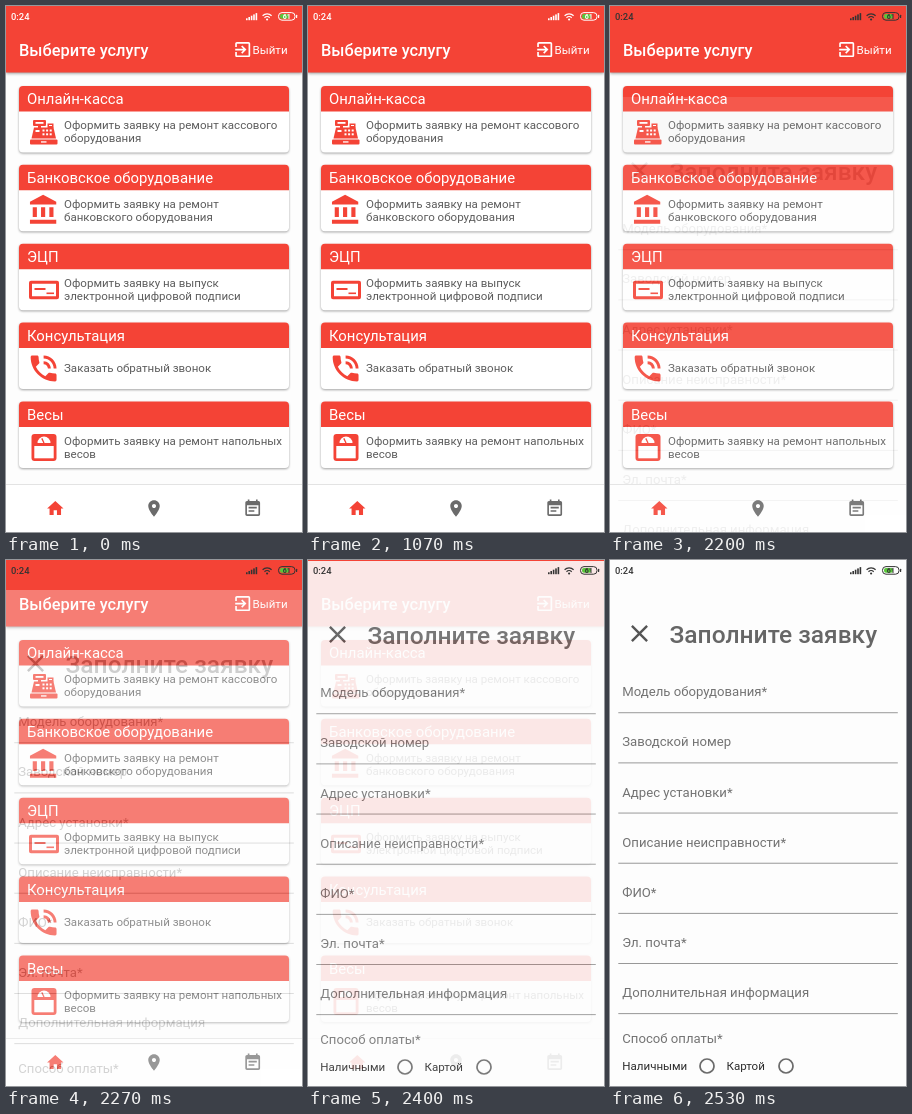
Write an HTML page that moves like this. It is 296x526 px and loops after 3390 ms.

```html
<!DOCTYPE html>
<html lang="ru">
<head>
<meta charset="utf-8">
<title>Выберите услугу</title>
<style>
  html, body { margin: 0; width: 100%; height: 100%; overflow: hidden; background: #fdfdfd; }
  svg { display: block; width: 296px; height: 526px; font-family: Roboto, "Noto Sans", sans-serif; }
  .bar { filter: drop-shadow(0 1px 1.5px rgba(0, 0, 0, .4)); }
  .card { filter: drop-shadow(0 1px 1px rgba(0, 0, 0, .36)); }
  .title { font-size: 16.4px; font-weight: 500; fill: #fff; }
  .head { font-size: 14.9px; fill: #fff; }
  .body { font-size: 11.55px; fill: #5c5c5c; }
  .label { font-size: 13.15px; fill: #737373; }
  .option { font-size: 11.55px; fill: #2c2c2c; }
</style>
</head>
<body>
<svg id="stage" viewBox="0 0 296 526">
  <g id="home"></g>
  <g id="form"></g>
  <g id="status"></g>
</svg>
<script>
const RED = '#f44336';
const PAPER = '#fdfdfd';
const LOOP = 3390;
const FPS = 15;
const OPEN = { start: 2116, length: 305, rise: 130 };

const ICONS = {
  exit: 'M10.09 15.59L11.5 17l5-5-5-5-1.41 1.41L12.67 11H3v2h9.67l-2.58 2.59zM19 3H5c-1.11 0-2 .9-2 2v4h2V5h14v14H5v-4H3v4c0 1.1.89 2 2 2h14c1.1 0 2-.9 2-2V5c0-1.1-.9-2-2-2z',
  bank: 'M4 10v7h3v-7H4zm6 0v7h3v-7h-3zM2 22h19v-3H2v3zm14-12v7h3v-7h-3zm-4.5-9L2 6v2h19V6l-9.5-5z',
  phone: 'M20 15.5c-1.25 0-2.45-.2-3.57-.57-.35-.11-.74-.03-1.02.24l-2.2 2.2c-2.83-1.44-5.15-3.75-6.59-6.59l2.2-2.21c.28-.26.36-.65.25-1C8.7 6.45 8.5 5.25 8.5 4c0-.55-.45-1-1-1H4c-.55 0-1 .45-1 1 0 9.39 7.61 17 17 17 .55 0 1-.45 1-1v-3.5c0-.55-.45-1-1-1zM19 12h2c0-4.97-4.03-9-9-9v2c3.87 0 7 3.13 7 7zm-4 0h2c0-2.76-2.24-5-5-5v2c1.66 0 3 1.34 3 3z',
  home: 'M10 20v-6h4v6h5v-8h3L12 3 2 12h3v8z',
  pin: 'M12 2C8.13 2 5 5.13 5 9c0 5.25 7 13 7 13s7-7.75 7-13c0-3.87-3.13-7-7-7zm0 9.5c-1.38 0-2.5-1.12-2.5-2.5s1.12-2.5 2.5-2.5 2.5 1.12 2.5 2.5-1.12 2.5-2.5 2.5z',
  note: 'M17 10H7v2h10v-2zm2-7h-1V1h-2v2H8V1H6v2H5c-1.1 0-2 .9-2 2v14c0 1.1.9 2 2 2h14c1.1 0 2-.9 2-2V5c0-1.1-.9-2-2-2zm0 16H5V8h14v11zm-5-5H7v2h7v-2z',
  close: 'M19 6.41L17.59 5 12 10.59 6.41 5 5 6.41 10.59 12 5 17.59 6.41 19 12 13.41 17.59 19 19 17.59 13.41 12z'
};

const byId = id => document.getElementById(id);
const text = (x, y, cls, s) => `<text x="${x}" y="${y}" class="${cls}">${s}</text>`;
const rect = (x, y, w, h, fill, rx = 0, more = '') =>
  `<rect x="${x}" y="${y}" width="${w}" height="${h}" rx="${rx}" fill="${fill}" ${more}/>`;
// Icon on a 24-unit grid, centred on (cx, cy).
const icon = (name, cx, cy, size, fill) =>
  `<path d="${ICONS[name]}" fill="${fill}" transform="translate(${cx - size / 2} ${cy - size / 2}) scale(${size / 24})"/>`;

function register() {
  let keys = '';
  for (let row = 0; row < 2; row++)
    for (let col = 0; col < 3; col++)
      keys += rect(36.5 + col * 3.6, 123.5 + row * 3.8, 2, 2, '#fff');
  return rect(27, 114, 13, 6, RED, 1) + rect(29.5, 116, 8, 1.8, '#fff')
    + rect(32, 119, 3, 4, RED)
    + `<path d="M28 121.5H47.5L50 132.5H25.5Z" fill="${RED}"/>`
    + rect(41.5, 117.5, 6, 4.5, RED) + rect(43, 119, 3, 1, '#fff')
    + rect(29.5, 124, 4, 2, '#fff') + keys
    + rect(24, 133.5, 27.5, 5, RED, 1) + rect(35, 135.3, 5.5, 1.3, '#fff');
}

function signature() {
  return rect(24.5, 276.2, 27, 15.6, 'none', .5, `stroke="${RED}" stroke-width="3"`)
    + rect(28.5, 282, 11, 2, RED) + rect(40.5, 286.5, 7.5, 1.6, RED);
}

function scales() {
  return rect(25.5, 428, 25, 27, RED, 3) + rect(28.3, 440, 19.4, 12.3, '#fff')
    + '<path d="M31.5 437a6.5 6.5 0 0 1 13 0z" fill="#fff"/>'
    + `<path d="M38 437l-2.2-4.6" stroke="${RED}" stroke-width="1.3"/>`;
}

const CARDS = [
  ['Онлайн-касса', register(), 'Оформить заявку на ремонт кассового', 'оборудования'],
  ['Банковское оборудование', icon('bank', 37.8, 204, 33.2, RED), 'Оформить заявку на ремонт', 'банковского оборудования'],
  ['ЭЦП', signature(), 'Оформить заявку на выпуск', 'электронной цифровой подписи'],
  ['Консультация', icon('phone', 37.6, 362.5, 34.5, RED), 'Заказать обратный звонок'],
  ['Весы', scales(), 'Оформить заявку на ремонт напольных', 'весов']
];

function card([name, picture, ...lines], i) {
  const y = 80 + i * 78.85;
  const first = lines.length > 1 ? 43.2 : 49.8;
  return `<g class="card">${rect(13, y, 270, 66.5, '#fff', 4)}</g>`
    + (i ? '' : rect(13, y + 20, 270, 46.5, '#3c5046', 4, 'id="press" opacity="0"'))
    + `<path d="M13 ${y + 25.5}v-21.500q0-4 4-4h262q4 0 4 4v21.500z" fill="${RED}"/>`
    + text(21, y + 18.2, 'head', name) + picture
    + lines.map((s, n) => text(58, y + first + n * 13.2, 'body', s)).join('');
}

byId('home').innerHTML = rect(0, 0, 296, 526, PAPER)
  + CARDS.map(card).join('')
  + `<g class="bar">${rect(0, -5, 296, 71.500, RED)}</g>`
  + text(13, 50, 'title', 'Выберите услугу')
  + icon('exit', 236.7, 43.6, 20, '#fff')
  + text(246.500, 47.8, 'body" style="fill:#fff', 'Выйти')
  + rect(0, 478, 296, 1, '#e3e3e3') + rect(0, 479, 296, 47, '#fff')
  + icon('home', 49.3, 502.5, 19.7, RED)
  + icon('pin', 148, 502.5, 19.7, '#6b6b6b')
  + icon('note', 246.700, 502.5, 19.7, '#6b6b6b');

const FIELDS = ['Модель оборудования*', 'Заводской номер', 'Адрес установки*',
  'Описание неисправности*', 'ФИО*', 'Эл. почта*', 'Дополнительная информация'];

const field = (s, i) => text(12.3, 136.3 + i * 50.15, 'label', s)
  + rect(8.300, 152.3 + i * 50.15, 279.5, .9, '#8d8d8d');
const radio = (x, label, cx) => text(x, 510, 'option', label)
  + `<circle cx="${cx}" cy="506" r="7" fill="none" stroke="#6b6b6b" stroke-width="1.7"/>`;

byId('form').innerHTML = rect(0, 0, 296, 526, PAPER)
  + icon('close', 29.5, 73.500, 29, '#555')
  + '<text x="59.5" y="83" font-size="24.5" font-weight="500" fill="#666">Заполните заявку</text>'
  + FIELDS.map(field).join('')
  + text(12.3, 482.500, 'label', 'Способ оплаты*')
  + radio(12.3, 'Наличными', 97) + radio(116.500, 'Картой', 176);

byId('status').innerHTML =
  '<text x="5" y="14" font-size="9.4" font-weight="500" fill="currentColor">0:24</text>'
  + [0, 1, 2, 3, 4].map(i => rect(240 + i * 2.4, 12.3 - i * 1.3, 1.6, 1.9 + i * 1.3, 'currentColor')).join('')
  + '<g fill="none" stroke="currentColor" stroke-width="1.2">'
  + '<path d="M256.600 9.700a6.400 6.400 0 0 1 9 0M258.500 11.700a3.700 3.700 0 0 1 5.200 0"/></g>'
  + '<circle cx="261.100" cy="13.500" r="1.100" fill="currentColor"/>'
  + rect(272.500, 6.600, 16.5, 7.600, 'none', 3.5, 'stroke="currentColor"')
  + rect(274, 8, 9, 4.800, '#58c63a', 2)
  + rect(290, 8.700, 1.2, 3.400, 'currentColor', .5)
  + '<text x="280.700" y="12.900" font-size="7" font-weight="700" text-anchor="middle" fill="currentColor">61</text>';

const clamp = v => Math.min(1, Math.max(0, v));

function bezier(x1, y1, x2, y2) {
  const at = (a, b, s) => 3 * (1 - s) ** 2 * s * a + 3 * (1 - s) * s * s * b + s ** 3;
  return x => {
    let lo = 0, hi = 1;
    for (let i = 0; i < 24; i++) {
      const mid = (lo + hi) / 2;
      if (at(x1, x2, mid) < x) lo = mid; else hi = mid;
    }
    return at(y1, y2, lo);
  };
}
const slide = bezier(.4, 0, .2, 1);
const fade = bezier(.42, 0, 1, 1);

function draw(time) {
  // The screen updates at a fixed rate.
  const t = Math.floor((time + 4) * FPS / 1000) * 1000 / FPS;
  const p = clamp((t - OPEN.start) / OPEN.length);
  const y = p < 1 ? Math.max(1, Math.round(OPEN.rise * (1 - slide(p)))) : 0;
  const form = byId('form');
  form.setAttribute('transform', `translate(0 ${y})`);
  form.setAttribute('opacity', p < 1 ? fade(p) : 1);
  form.setAttribute('visibility', p > 0 ? 'visible' : 'hidden');

  const press = t < 1930 ? 0 : .03 + .03 * clamp((t - 1930) / 130);
  byId('press').setAttribute('opacity', press * (1 - clamp((t - 2130) / 150)));
  byId('status').setAttribute('color', t < 2190 ? '#fff' : '#333');
}

const begin = performance.now();
function tick() {
  draw((performance.now() - begin) % LOOP);
  requestAnimationFrame(tick);
}
tick();
</script>
</body>
</html>
```
